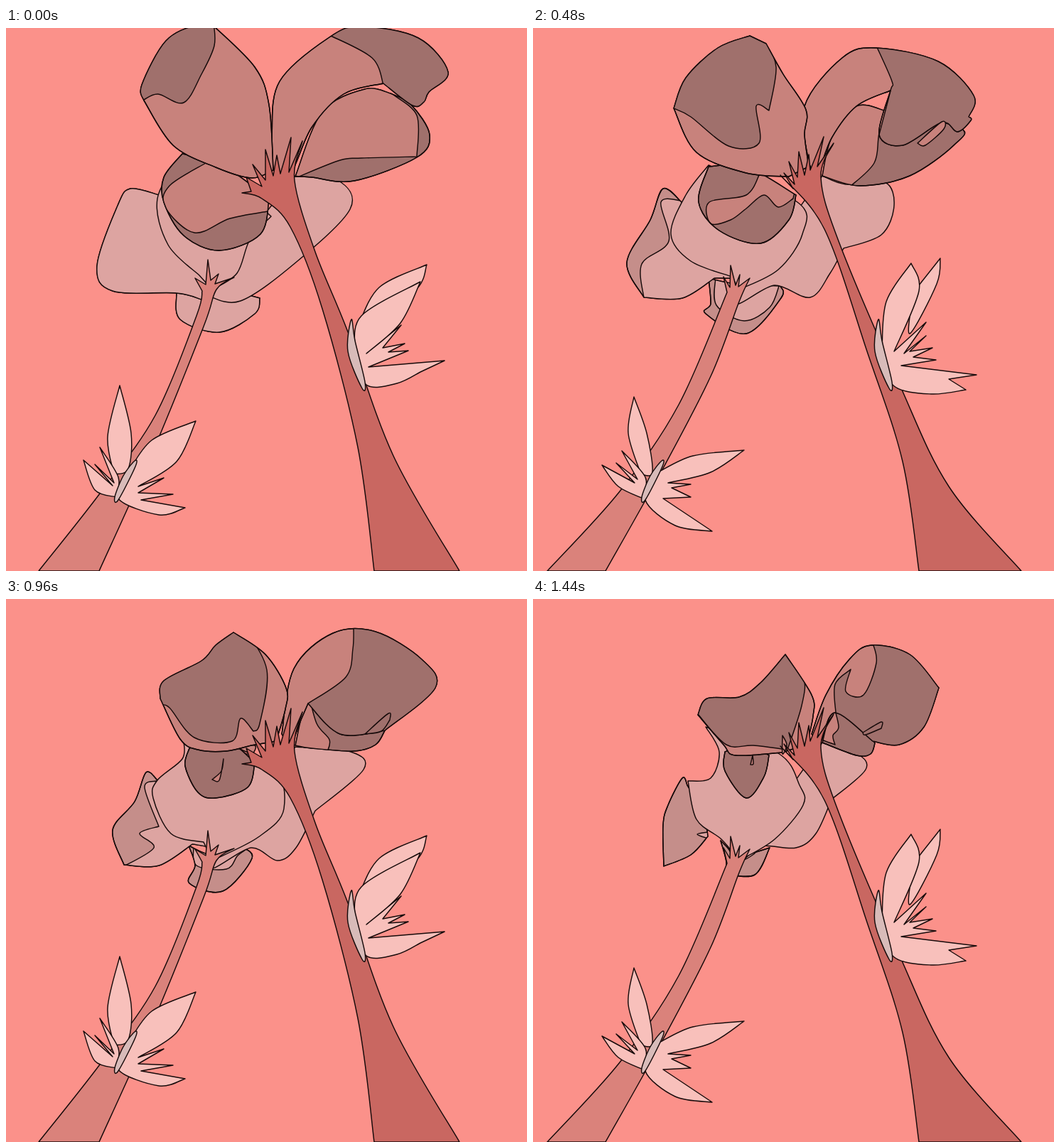
Recreate the animation shown at these times as an HTML page. Size 733 by 764 pixels, loop 1600 ms.

```html
<!DOCTYPE html>
<html lang="en">
<head>
<meta charset="utf-8">
<title>Closing flowers</title>
<style>
html, body { margin: 0; width: 100%; height: 100%; overflow: hidden; background: #fb918a; }
svg { display: block; width: 100%; height: 100%; }
path { stroke: #160a0a; stroke-width: 1.45; stroke-linejoin: round; }
</style>
</head>
<body>
<svg id="stage" viewBox="0 0 733 764"></svg>
<script>
const STEP = 160, STEPS = 10, SAMPLES = 160;
const PALE = "#dda4a1", PALE_DARK = "#c58e8a", THIN = "#da827b";
const ROSE = "#c8827c", ROSE_DARK = "#a0706c", THICK = "#c96761";
const LEAF = "#f8c0bb", RING = "#d8bbb9";
const stage = document.getElementById("stage");
const parts = [];

function add(tag, parent, attributes = {}) {
  const node = parent.appendChild(document.createElementNS("http://www.w3.org/2000/svg", tag));
  for (const name in attributes) node.setAttribute(name, attributes[name]);
  return node;
}

function curve(points, loop) {
  const n = points.length;
  const at = i => points[loop ? (i + n) % n : Math.max(0, Math.min(n - 1, i))];
  let d = "";
  for (let i = 0; i < (loop ? n : n - 1); i++) {
    const [a, b, c, e] = [at(i - 1), at(i), at(i + 1), at(i + 2)];
    const near = b.map((v, k) => v + (c[k] - a[k]) / 6);
    const far = c.map((v, k) => v - (e[k] - b[k]) / 6);
    d += `C${near} ${far} ${c}`;
  }
  return d;
}

// Points are joined by smooth curves; "/" makes the point before it a corner.
function outline(spec) {
  const runs = spec.split("/").map(run => run.trim().split(/\s+/).filter(Boolean).map(p => p.split(",").map(Number)));
  const first = runs[0][0];
  if (runs.length === 1) return `M${first}${curve(runs[0], true)}Z`;
  let d = `M${first}`, pen = first;
  runs.forEach((run, i) => {
    const points = i ? [pen, ...run] : run;
    if (i === runs.length - 1) points.push(first);
    d += curve(points, false);
    pen = points[points.length - 1];
  });
  return d + "Z";
}

const ruler = add("path", add("defs", stage));

function sample(spec) {
  ruler.setAttribute("d", outline(spec));
  const length = ruler.getTotalLength();
  return Array.from({ length: SAMPLES }, (_, i) => ruler.getPointAtLength(length * i / SAMPLES));
}

function blend(from, to, t) {
  const a = sample(from), b = sample(to);
  const mix = (p, q) => (p + (q - p) * t).toFixed(1);
  return "M" + a.map((p, i) => `${mix(p.x, b[i].x)},${mix(p.y, b[i].y)}`).join("L") + "Z";
}

// The outline at a step; empty outside the range of the keys.
function drawing(keys, step) {
  if (keys[step]) return outline(keys[step]);
  const times = Object.keys(keys).map(Number);
  const before = times.filter(t => t < step).pop();
  const after = times.find(t => t > step);
  if (before === undefined || after === undefined) return "";
  return blend(keys[before], keys[after], (step - before) / (after - before));
}

function shape(node, drawings) {
  parts.push({ node, drawings });
}

const everyStep = make => Array.from({ length: STEPS }, (_, step) => make(step));

// A petal, optionally with a second tone that is cut off at its edge.
function petal(fill, body, cutFill, cut) {
  const bodies = everyStep(step => drawing(body, step));
  shape(add("path", stage, { fill }), bodies);
  if (!cut) return;
  const id = "clip" + parts.length;
  shape(add("path", add("clipPath", stage, { id })), bodies);
  const group = add("g", stage, { "clip-path": `url(#${id})` });
  shape(add("path", group, { fill: cutFill }), everyStep(step => drawing(cut, step)));
  shape(add("path", stage, { fill: "none" }), bodies);
}

// A part that rocks between two poses.
function sway(fill, even, odd = even) {
  shape(add("path", stage, { fill }), everyStep(step => outline(step % 2 ? odd : even)));
}

// Back flower
petal(PALE_DARK, {
  0: "240,373 / 245,410 300,428 350,402 357,380 / 290,365",
  3: "247,352 / 250,388 243,402 300,430 349,380 348,363 / 285,360",
  6: "257,347 / 266,375 258,400 305,411 346,365 330,348 / 290,360",
  9: "264,340 / 272,370 270,387 / 312,388 333,350 / 290,360"
}, PALE, {
  0: "230,365 / 230,420 300,440 370,410 365,370",
  3: "257,350 / 258,390 297,412 333,393 347,360 / 285,350",
  6: "264,347 / 268,375 310,380 325,362 335,348",
  9: "268,341 / 290,368 316,350"
});
petal(PALE, {
  0: "407,208 / 468,215 484,255 410,328 330,384 280,375 / 350,280",
  3: "407,208 / 440,220 495,217 508,250 490,291 437,310 / 418,345 390,379 340,362 288,380",
  6: "407,208 / 485,215 503,240 435,298 / 408,350 382,368 345,350 290,372",
  9: "407,202 / 455,217 468,240 420,282 / 398,330 370,350 320,348 290,370"
});
petal(PALE_DARK, {
  0: "215,235 / 175,226 157,250 128,335 150,370 240,373 275,382 / 290,340",
  3: "209,245 / 183,226 165,270 132,330 156,379 / 210,380 255,352 / 290,340",
  6: "213,255 / 197,244 181,285 150,325 166,374 / 215,375 262,345 / 290,340",
  9: "217,262 / 210,252 190,290 183,318 184,376 / 222,360 246,334 / 240,300"
}, PALE, {
  0: "215,225 / 150,220 120,260 120,350 140,380 / 270,390 290,300",
  3: "209,243 / 180,245 191,300 153,332 156,380 / 270,390 290,300",
  6: "212,256 / 195,265 215,320 / 188,330 208,350 166,376 / 270,390 290,300",
  9: "246,328 / 231,331 246,336"
});
petal(PALE, {
  0: "248,178 / 213,240 228,305 272,348 / 290,368 / 325,345 343,298 373,265 / 300,200",
  3: "247,193 / 215,235 194,290 222,328 280,350 / 290,368 / 345,340 379,290 372,245",
  6: "250,200 / 248,225 213,255 207,280 232,330 278,342 / 290,368 / 355,335 391,295 370,230",
  9: "243,180 / 262,215 250,252 218,256 / 230,310 265,338 290,368 / 340,338 380,290 375,262 345,217"
});
sway(THIN,
  "46,764 / 132,655 210,545 268,405 276,370 / 266,352 / 281,361 / 284,326 / 288,355 / 299,346 / 294,360 / 321,351 / 296,368 278,420 207,595 131,764 /",
  "20,764 / 122,652 205,530 273,372 / 268,350 / 277,365 / 278,334 / 285,362 / 291,347 / 289,364 / 305,352 / 290,385 250,490 180,625 102,764 /");
sway(LEAF,
  "152,628 / 143,575 160,503 / 176,570 172,620",
  "152,628 / 134,570 142,519 / 160,570 168,625");
sway(LEAF,
  "172,625 / 205,580 267,553 / 240,610 186,645 / 222,633 / 186,654 / 235,656 / 190,664 / 252,675 / 215,685 158,662",
  "176,625 / 225,602 297,594 / 250,625 190,640 / 222,642 / 195,647 / 222,660 / 183,662 / 252,708 / 200,700 158,664");
sway(LEAF,
  "155,660 / 125,650 109,608 / 150,644 / 125,614 / 152,640 / 132,590 / 158,632",
  "155,662 / 120,645 97,615 / 143,640 / 117,612 / 147,635 / 125,595 / 158,632");
sway(RING, "181,609 182,617 158,664 153,660 165,630");

// Front flower
petal(ROSE_DARK, {
  0: "248,177 / 222,210 222,245 250,292 300,313 358,290 370,240 / 300,190",
  3: "247,195 / 233,245 262,285 320,303 360,270 370,235 / 300,195",
  6: "258,210 / 252,235 270,272 295,280 340,265 350,230 / 310,200",
  9: "270,215 / 270,242 300,280 325,250 332,220 / 300,205"
}, ROSE, {
  0: "281,190 / 230,222 224,252 265,288 315,268 368,258 / 390,200",
  3: "319,205 / 300,235 248,245 250,275 278,270 300,254 325,235 345,252 366,240 / 370,200",
  4: "268,252 / 305,238 300,255 268,264",
  6: "290,254 / 303,242 306,225 / 300,255",
  9: "306,233 / 309,220 / 310,232"
});
petal(ROSE, {
  4: "324,205 / 325,222 350,222 / 350,205",
  6: "320,207 / 347,219 / 350,206"
});
petal(ROSE_DARK, {
  0: "407,209 / 445,118 505,86 541,92 / 570,108 596,150 578,182 490,215 430,210",
  3: "407,208 / 420,155 455,110 497,117 / 600,140 592,165 530,208 460,222",
  6: "407,206 / 425,147 470,150 533,185 / 520,205 490,214 430,210",
  9: "407,202 / 424,160 470,190 481,203 / 475,218 455,220"
}, ROSE, {
  0: "560,95 / 543,92 578,123 578,181 / 500,183 470,186 412,209 / 380,190 440,70",
  3: "500,100 / 487,148 480,190 445,224 / 380,210 440,90",
  6: "425,130 / 437,175 455,198 452,215 / 390,215",
  9: "423,150 / 430,180 422,192 425,205 / 400,190"
});
petal(ROSE, {
  0: "376,200 / 374,150 385,75 455,13 500,-2 580,14 622,62 595,90 588,104 572,109 531,78 / 475,93 430,140 400,205",
  3: "388,190 / 382,110 435,42 483,28 570,47 620,95 613,125 / 616,130 597,146 575,133 520,165 487,150 503,88 / 455,110 420,155 400,205",
  6: "388,190 / 405,98 460,48 520,46 585,85 604,125 533,185 / 470,190 425,147 / 415,170 400,205",
  9: "392,190 / 412,135 445,85 476,65 530,78 571,125 / 550,180 515,205 478,200 / 425,160 405,200"
}, ROSE_DARK, {
  0: "455,10 / 515,42 531,80 / 540,130 650,60 500,-30",
  3: "483,25 / 505,75 503,88 487,150 / 500,200 650,140 560,10",
  6: "489,38 / 488,70 478,110 425,147 / 450,210 620,190 580,30",
  9: "478,62 / 483,90 465,135 440,130 447,99 / 425,120 426,160 / 440,230 620,190 560,40"
});
petal(ROSE, {
  3: "541,162 / 575,132 578,142 552,165",
  4: "545,154 / 561,143 556,156"
});
petal(ROSE_DARK, {
  6: "505,190 / 538,161 540,170 / 528,186",
  9: "464,188 / 490,173 490,182 / 468,191"
});
petal(ROSE, {
  0: "292,-3 / 350,55 370,108 376,200 / 345,211 295,196 235,165 194,102 / 191,80 225,18 270,-5",
  3: "305,11 / 328,22 / 352,65 384,115 382,150 388,195 / 360,209 / 300,204 230,175 198,113 / 215,70 260,28",
  6: "320,47 / 365,78 394,125 393,155 380,200 / 345,206 / 310,214 270,212 245,197 217,140 / 222,115 275,87 295,65",
  9: "355,78 / 392,135 394,165 385,205 / 350,216 / 285,220 268,205 232,163 / 245,140 290,138 320,118"
}, ROSE_DARK, {
  0: "292,-8 / 293,25 275,65 250,105 214,93 194,101 / 170,90 200,-20",
  2: "312,5 / 324,50 318,67 304,72 315,125 300,163 250,150 197,106 / 180,80 220,-10",
  3: "326,15 / 342,55 332,116 / 314,110 318,162 275,166 222,125 198,113 / 180,80 250,0",
  6: "335,40 / 367,100 357,175 348,186 / 330,168 318,200 265,195 230,153 217,150 / 200,90 290,40",
  9: "358,70 / 381,110 378,150 358,212 / 310,206 272,205 232,162 / 220,130 300,90"
});
petal(ROSE, {
  8: "345,188 / 354,195 352,207 345,205",
  9: "351,192 / 357,205 351,218"
});
sway(THICK,
  "332,232 / 345,230 / 338,210 / 360,223 / 347,192 / 365,214 / 365,171 / 376,208 / 381,179 / 386,205 / 401,154 / 398,203 / 417,159 / 406,215 435,315 480,425 545,602 638,764 / 518,764 / 495,590 445,395 400,280 360,240",
  "348,207 / 366,226 / 353,204 / 368,220 / 360,188 / 372,210 / 374,174 / 382,207 / 388,178 / 390,200 / 409,153 / 400,195 / 423,162 / 405,210 430,300 515,500 585,645 687,764 / 543,764 / 520,610 470,455 410,283");
sway(LEAF,
  "495,420 / 525,365 592,333 / 575,370",
  "535,372 / 573,324 / 568,360 530,430");
sway(LEAF,
  "491,455 / 500,405 583,357 / 555,415 507,458 / 556,418 / 530,450 / 561,444 / 538,456 / 566,454 / 510,477 / 617,468 / 583,484 / 550,500 507,502",
  "491,455 / 497,385 532,331 / 543,370 508,455 / 553,414 / 522,458 / 553,433 / 530,455 / 562,450 / 535,463 / 567,467 / 518,475 / 624,488 / 585,494 / 609,509 / 560,515 507,503");
sway(RING, "486,410 491,440 505,498 501,507 481,455");

const start = performance.now();
let shown = -1;

function render() {
  const step = Math.floor((performance.now() - start) / STEP) % STEPS;
  if (step !== shown) {
    for (const { node, drawings } of parts) node.setAttribute("d", drawings[step]);
    shown = step;
  }
  requestAnimationFrame(render);
}
render();
</script>
</body>
</html>
```
